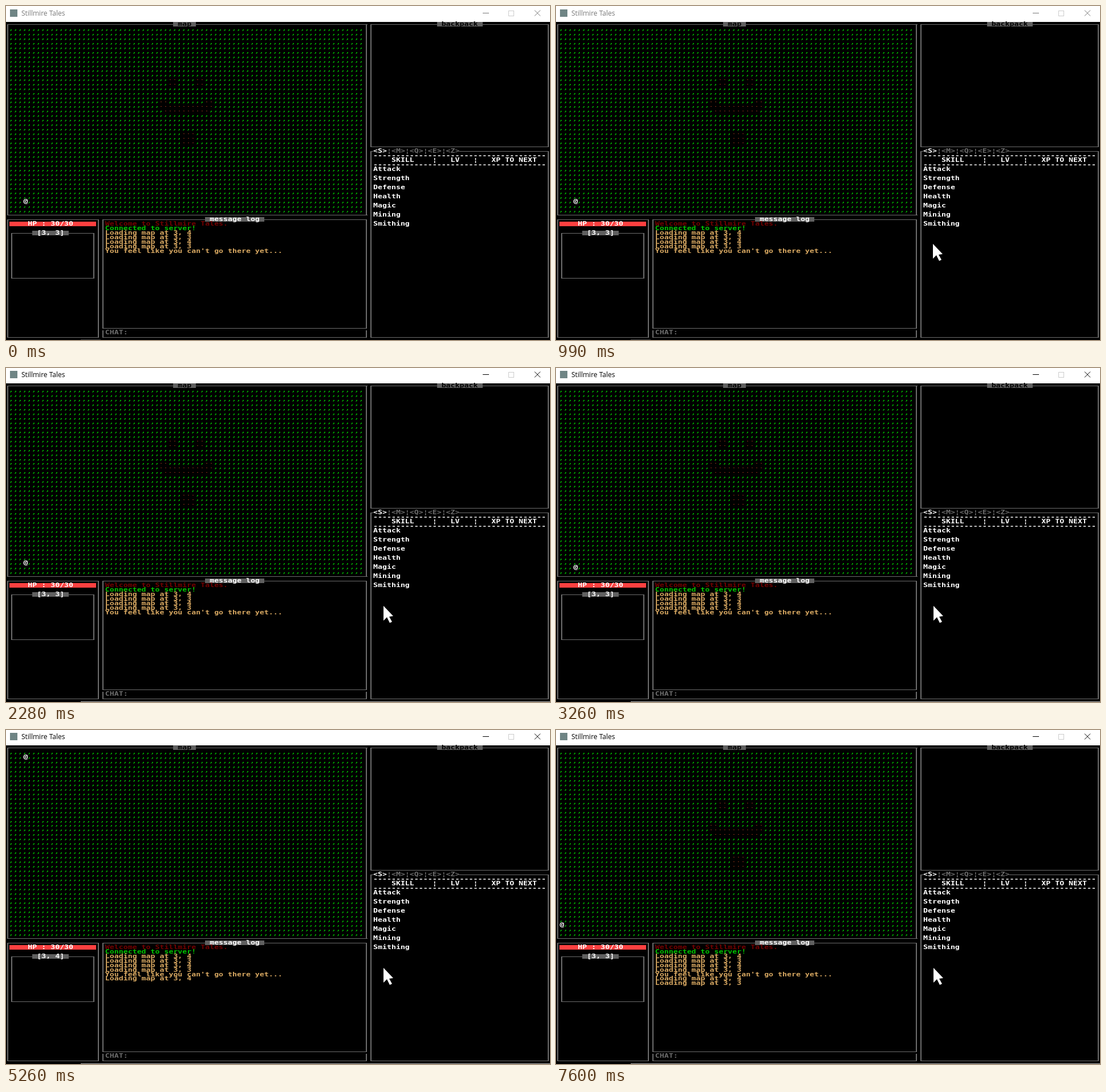
An HTML page with a canvas that plays this animation: 954x587 px, repeating every 8000 ms.

```html
<!DOCTYPE html>
<html lang="en">
<head>
<meta charset="utf-8">
<title>Stillmire Tales</title>
<style>
  html, body { margin: 0; width: 100%; height: 100%; overflow: hidden; background: #000; }
  canvas { display: block; }
</style>
</head>
<body>
<canvas id="stage" width="954" height="587"></canvas>
<script>
const ctx = document.getElementById('stage').getContext('2d');
const LOOP = 8000, CELL = 7.97;
const GAME = 'Stillmire Tales';
const GREY = '#6c6c6c', LABEL = '#606060', TAN = '#d9a962';

// Centre of a character cell
const cx = col => 2.5 + col * CELL;
const cy = row => 31 + row * CELL;

// Player steps: [time, column, row, map]
const STEPS = [
  [0, 4, 39, 3], [3260, 4, 40, 3], [3600, 4, 41, 3], [4190, 4, 1, 4],
  [5260, 4, 2, 4], [5790, 4, 1, 4], [6250, 4, 41, 3], [6530, 4, 40, 3],
  [6730, 4, 39, 3], [7060, 3, 39, 3], [7310, 2, 39, 3], [7600, 1, 39, 3]
];

// Pointer positions: [time, x, y]
const POINTER = [
  [130, 915, 562], [196, 800, 472], [262, 694, 408],
  [328, 646, 393], [394, 655, 410], [460, 661, 418], [2200, 662, 418]
];

// Log lines: [time, text, colour]
const LOG = [
  [0, `Welcome to ${GAME}.`, '#720000'],
  [0, 'Connected to server!', '#00c400'],
  [0, 'Loading map at 3, 4', TAN],
  [0, 'Loading map at 3, 3', TAN],
  [0, 'Loading map at 3, 4', TAN],
  [0, 'Loading map at 3, 3', TAN],
  [0, "You feel like you can't go there yet...", TAN],
  [4190, 'Loading map at 3, 4', TAN],
  [6250, 'Loading map at 3, 3', TAN]
];

const SKILLS = ['Attack', 'Strength', 'Defense', 'Health', 'Magic', 'Mining', 'Smithing'];

// Dirt patches: [first column, last column, first row, last row]
const DIRT = [
  [36, 37, 12, 13], [42, 43, 12, 13], [34, 35, 17, 17], [44, 45, 17, 17],
  [34, 45, 18, 18], [35, 44, 19, 19], [39, 41, 24, 26]
];

const latest = (list, t) => list.filter(item => item[0] <= t).pop();

function box(color, x, y, w, h) {
  ctx.fillStyle = color;
  ctx.fillRect(Math.round(x), Math.round(y), w, h);
}

// Terminal text: one glyph per square cell
function print(text, col, row, color) {
  ctx.font = 'bold 10px "DejaVu Sans Mono", monospace';
  ctx.textAlign = 'center';
  ctx.fillStyle = color;
  [...text].forEach((glyph, i) => {
    if (glyph === ' ') return;
    ctx.save();
    ctx.translate(cx(col + i), Math.round(cy(row) + 3));
    ctx.scale(CELL / 6.02, 0.96);
    ctx.fillText(glyph, 0, 0);
    ctx.restore();
  });
}

function panel(left, top, right, bottom) {
  const x = cx(left) - 1, y = cy(top), w = cx(right) - cx(left), h = cy(bottom) - y;
  for (const edge of [y, y + h]) box(GREY, x, edge, Math.round(w) + 2, 1);
  for (const edge of [x, x + w]) box(GREY, edge, y, 2, Math.round(h));
}

function label(text, col, row, color) {
  box(LABEL, cx(col) - 4, cy(row) - 4, Math.round((text.length + 2) * CELL), 8);
  print(text, col + 1, row, color);
}

function drawMap(map, col, row) {
  const isDirt = (c, r) => map === 3 &&
    DIRT.some(([c0, c1, r0, r1]) => c >= c0 && c <= c1 && r >= r0 && r <= r1);
  for (let r = 1; r <= 41; r++) {
    for (let c = 1; c <= 78; c++) {
      if (c === col && r === row) continue;
      const x = cx(c), y = cy(r);
      if (isDirt(c, r)) {
        box('#803018', x - 2, y + 1, 2, 1);
      } else {
        box('#00a000', x - 2, y + 1, 2, 2);
        box('#008c00', x - 3, y + 3, 2, 1);
      }
    }
  }
  print('@', col, row, '#fff');
}

function drawSkills() {
  panel(80, 28, 119, 69);
  box('#000', cx(81) - 4, cy(28) - 4, Math.round(19 * CELL), 8);
  print('<S>', 81, 28, '#fff');
  print('¦<M>¦<Q>¦<E>¦<Z>', 84, 28, GREY);
  for (const row of [29, 31]) print('-'.repeat(38), 81, row, '#fff');
  print('SKILL    ¦   LV   ¦   XP TO NEXT', 85, 30, '#fff');
  SKILLS.forEach((skill, i) => print(skill, 81, 32 + 2 * i, '#fff'));
}

function drawTerminal(t) {
  const [, col, row, map] = latest(STEPS, t);
  panel(0, 0, 79, 42);
  label('map', 37, 0, '#000');
  drawMap(map, col, row);

  panel(80, 0, 119, 27);
  label('backpack', 95, 0, '#000');
  drawSkills();

  panel(0, 43, 20, 69);
  box('#ff4040', cx(1) - 4, cy(44) - 4, 152, 8);
  print('HP : 30/30', 5, 44, '#fff');
  panel(1, 46, 19, 56);
  label(`[3, ${map}]`, 6, 46, '#fff');

  panel(21, 43, 79, 67);
  label('message log', 44, 43, '#fff');
  LOG.forEach(([start, text, color], i) => {
    if (t >= start) print(text, 22, 44 + i, color);
  });
  for (const side of [21, 79]) box(GREY, cx(side) - 1, cy(68) - 4, 2, 12);
  box(GREY, cx(21) - 1, cy(69), Math.round(58 * CELL) + 2, 1);
  print('CHAT:', 22, 68, GREY);
}

function drawTitleBar(active) {
  const ink = active ? '#000' : '#777';
  box('#fff', 0, -1, 954, 28);
  box('#6f8585', 7, 5, 13, 13);
  ctx.font = '12px "Open Sans", sans-serif';
  ctx.textAlign = 'left';
  ctx.fillStyle = ink;
  ctx.fillText(GAME, 27, 16);
  box(ink, 836, 11, 11, 1);
  ctx.lineWidth = 1;
  ctx.strokeStyle = '#ccc';
  ctx.strokeRect(881.5, 7.5, 9, 9);
  ctx.strokeStyle = ink;
  ctx.stroke(new Path2D('M927 6.5l10 10m0-10l-10 10'));
}

function drawPointer(t) {
  const spot = latest(POINTER, t);
  if (!spot) return;
  ctx.save();
  ctx.translate(spot[1], spot[2]);
  const arrow = new Path2D('M0 0V26L6 20 11 30 15 28 10 19 17 18Z');
  ctx.strokeStyle = '#000';
  ctx.lineWidth = 2;
  ctx.stroke(arrow);
  ctx.fillStyle = '#fff';
  ctx.fill(arrow);
  ctx.restore();
}

function draw(t) {
  const lowered = t < 1070;
  box('#000', 0, 0, 954, 587);
  ctx.save();
  ctx.translate(0, lowered ? 1 : 0);
  drawTitleBar(t >= 2200);
  drawTerminal(t);
  ctx.restore();
  if (lowered) box('#444', 131, 586, 35, 1);
  else box('#bbb', 131, 586, 823, 1);
  drawPointer(t);
}

function frame() {
  draw(performance.now() % LOOP);
  requestAnimationFrame(frame);
}
frame();
</script>
</body>
</html>
```
